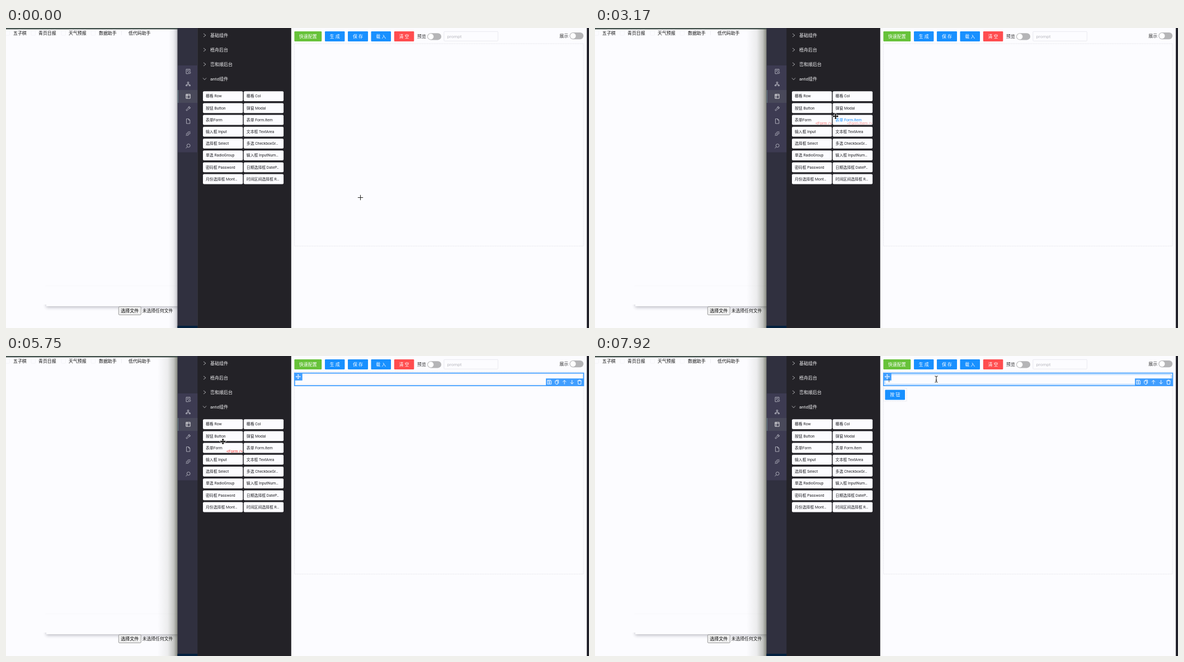
An HTML page with a canvas that plays this animation: 1042 by 537 pixels, repeating every 8 s.

```html
<!DOCTYPE html>
<html lang="zh-CN">
<head>
<meta charset="utf-8">
<title>低代码助手</title>
<style>
html, body { margin: 0; width: 100%; height: 100%; overflow: hidden; background: #fcfcff; }
canvas { display: block; width: 1042px; height: 537px; }
</style>
</head>
<body>
<canvas id="stage"></canvas>
<script>
const W = 1042, H = 537, LOOP = 8000, FPS = 12;
const canvas = document.getElementById('stage');
const ctx = canvas.getContext('2d');
const dpr = window.devicePixelRatio || 1;
canvas.width = W * dpr;
canvas.height = H * dpr;

const FONT = 'Roboto, "Noto Sans CJK SC", "Noto Sans CJK", sans-serif';
const PAGE = '#fcfcff', BLUE = '#1890ff', PICK = '#409eff';

function rect(x, y, w, h, color) {
  ctx.fillStyle = color;
  ctx.fillRect(x, y, w, h);
}

function box(x, y, w, h, r, fill, stroke, lw = 0.7) {
  ctx.beginPath();
  ctx.roundRect(x, y, w, h, r);
  if (fill) { ctx.fillStyle = fill; ctx.fill(); }
  if (stroke) { ctx.strokeStyle = stroke; ctx.lineWidth = lw; ctx.stroke(); }
}

function text(str, x, y, color, size = 8, align = 'left', weight = 400) {
  ctx.font = `${weight} ${size}px ${FONT}`;
  ctx.textAlign = align;
  ctx.textBaseline = 'alphabetic';
  ctx.fillStyle = color;
  ctx.fillText(str, x, y + size * 0.37);
}

// Strokes SVG path data around a centre point.
function icon(d, x, y, color, lw = 0.9) {
  ctx.save();
  ctx.translate(x, y);
  ctx.strokeStyle = color;
  ctx.lineWidth = lw;
  ctx.stroke(new Path2D(d));
  ctx.restore();
}

function dashed(x, y, w, h, color = '#d6d6dc') {
  ctx.save();
  ctx.setLineDash([1.8, 1.2]);
  ctx.strokeStyle = color;
  ctx.lineWidth = 0.6;
  ctx.strokeRect(x, y, w, h);
  ctx.restore();
}

const SIDE_ICONS = [
  'M1 4H-3.5V-4H3.5V-0.5M-2-2H2M-2 0H0M1 2A1.7 1.7 0 1 0 4.4 2A1.7 1.7 0 1 0 1 2',
  'M-1.2-3.3H1.2V-1H-1.2ZM0-1V1M-2.8 2V1H2.8V2M-4 2H-1.6V3.6H-4ZM1.6 2H4V3.6H1.6Z',
  'M-3.7-3.7H3.7V3.7H-3.7ZM-3.7-1.5H3.7M-1.5-3.7V3.7',
  'M-3.7 2.3L0-1.4A2.5 2.5 0 0 1 2.6-3.9L1.4-2.2L2.4-1.2L4-2.5A2.5 2.5 0 0 1 1.4 0L-2.3 3.7Z',
  'M-3-4.2H1L3.3-1.9V4.2H-3ZM1-4.2V-1.9H3.3',
  'M-4 4L-2.5 2.5M4-4L2.7-2.7M-2.5 2.5A2.2 2.2 0 0 1-2-1L1 2A2.2 2.2 0 0 1-2.5 2.5M2.7-2.7A2.2 2.2 0 0 1 2.3 1L-.8-2.1A2.2 2.2 0 0 1 2.7-2.7',
  'M-1.7 1.5L-4 4M-2.2-.8A2.9 2.9 0 1 0 3.6-.8A2.9 2.9 0 1 0-2.2-.8'
];

const TOOL_ICONS = [
  'M-3.5-3.5H2.3L3.5-2.3V3.5H-3.5ZM-1.7-3.5V-1.5H1.5V-3.5M-1.2 1.2A1.2 1.2 0 1 0 1.2 1.2A1.2 1.2 0 1 0-1.2 1.2',
  'M-1.5-3.7H3V2.5M-3-2.3H1.3V3.7H-1.2L-3 2Z',
  'M0 3.7V-3.3M-3-.2L0-3.3L3-.2',
  'M0-3.7V3.3M-3 .2L0 3.3L3 .2',
  'M-3.7-2.4H3.7M-1.4-2.4V-3.7H1.4V-2.4M-2.9-2.4L-2.5 3.7H2.5L2.9-2.4'
];

const MOVE = 'M-4 0H4M0-4V4M-2.8-1.2L-4 0L-2.8 1.2M2.8-1.2L4 0L2.8 1.2M-1.2-2.8L0-4L1.2-2.8M-1.2 2.8L0 4L1.2 2.8';

function drawLeftPage(focused) {
  rect(0, 0, 307, H, PAGE);
  rect(0, 0, 307, 2.4, '#46544f');
  [['五子棋', 13], ['青页日报', 58], ['天气预报', 112], ['数据助手', 166], ['低代码助手', 219]]
    .forEach(([label, x]) => text(label, x, 9, '#111', 7.9));
  [-1, 45, 99, 152].forEach(x => box(x, 5, 7.5, 8, 1, null, '#eeeef3', 0.6));
  rect(206, 5, 0.6, 8, '#e4e4ea');

  ctx.save();
  ctx.shadowColor = 'rgba(40,40,60,.32)';
  ctx.shadowBlur = 6 * dpr;
  ctx.shadowOffsetY = 2 * dpr;
  rect(72, 470, 240, 28, PAGE);
  ctx.restore();
  rect(60, 455, 247, 40, PAGE);
  rect(70, 461.5, 237, 0.5, '#f3f3f6');
  box(201.3, 499, 40, 14.5, 1.6, '#efefef', '#767676', 0.7);
  text('选择文件', 221.3, 506.3, '#000', 8, 'center', 500);
  text('未选择任何文件', 243.7, 506.3, '#111', 7.8);

  const from = focused ? 271 : 291;
  const g = ctx.createLinearGradient(from, 0, 307, 0);
  const tint = focused ? '50,54,36' : '45,45,60';
  g.addColorStop(0, `rgba(${tint},0)`);
  g.addColorStop(0.5, `rgba(${tint},${focused ? 0.08 : 0.06})`);
  g.addColorStop(0.8, `rgba(${tint},${focused ? 0.28 : 0.17})`);
  g.addColorStop(1, `rgba(${tint},${focused ? 0.6 : 0.38})`);
  ctx.fillStyle = g;
  ctx.fillRect(from, 2, 307 - from, H);
}

function drawSidebar() {
  rect(306.5, 0, 36, H, '#30303f');
  rect(307, 67, 35.5, 155.5, '#3d3b52');
  rect(307, 111, 35.5, 23, '#49495a');
  rect(307, 111, 1, 23, '#67808c');
  rect(306.5, 533, 36, 4, '#03213f');
  SIDE_ICONS.forEach((d, i) =>
    icon(d, 325.5, 77.8 + i * 22.25, i === 2 ? '#fff' : '#c6c6d0', 0.8));
}

const CARDS = [
  '栅格 Row', '栅格 Col', '按钮 Button', '弹窗 Modal', '表单Form', '表单 Form.Item',
  '输入框 Input', '文本框 TextArea', '选择框 Select', '多选 CheckboxGr…',
  '单选 RadioGroup', '输入框 InputNum…', '密码框 Password', '日期选择框 DateP…',
  '月份选择框 Mont…', '时间区间选择框 R…'
];

// card, step entered, step left, tag
const HOVERS = [
  [0, 28.7, 31, 'Row'], [2, 31, 33, 'Button'], [4, 33, 37, 'Form'],
  [5, 37, 39, 'Form.Item'], [3, 39, 43, 'Modal'], [5, 43, 45, 'Form.Item'],
  [6, 46, 59, 'Input'], [4, 64, 69, 'Form'], [2, 70, 82, 'Button']
];

function drawPanel(n) {
  rect(342.5, 0, 167.5, H, '#232227');
  ['基础组件', '梧舟后台', '峦和顺后台', 'antd组件'].forEach((label, i) => {
    const y = 13 + i * 26;
    icon(i < 3 ? 'M-2-3L2 0L-2 3' : 'M-3-1.6L0 1.8L3-1.6', 355, y, '#c8c8cc', 0.8);
    text(label, 365, y, '#f2f2f4', 8);
  });
  const spot = i => [352 + (i % 2) * 72.8, 113.2 + (i >> 1) * 21.2];
  CARDS.forEach((label, i) => {
    const [x, y] = spot(i);
    const hot = HOVERS.some(([c, a, b]) => c === i && n >= a && n < b);
    box(x, y, 71.3, 17.8, 2, PAGE);
    text(label, x + 5, y + 8.7, hot ? BLUE : '#222226', 6.86);
  });
  HOVERS.forEach(([i, a, b, tag]) => {
    const alpha = Math.min(1, (n - a) / 2, 1 - (n - b) / 3);
    if (alpha <= 0) return;
    const [x, y] = spot(i);
    ctx.globalAlpha = alpha;
    text(`<${tag} />`, x + 71, y + 14.3, '#f5302d', 7.2, 'right');
    ctx.globalAlpha = 1;
  });
}

function button(label, x, y, w, color, weight = 400) {
  box(x, y, w, 18, 1.2, color);
  text(label, x + w / 2, y + 9, '#fff', 8, 'center', weight);
}

function toggle(x, y) {
  box(x, y, 25, 12.2, 6.1, '#b5b5b7');
  ctx.beginPath();
  ctx.arc(x + 6.2, y + 6.1, 5.1, 0, 7);
  ctx.fillStyle = '#fff';
  ctx.fill();
}

function drawHeader() {
  rect(509.8, 0, 528.4, H, PAGE);
  button('快速配置', 515.4, 6, 48.8, '#67c23a', 500);
  button('生 成', 570, 6, 35.4, BLUE, 500);
  button('保 存', 611, 6, 36, BLUE, 500);
  button('载 入', 652.5, 6, 35.5, BLUE, 500);
  button('清 空', 693.8, 6, 35.5, '#ff4d4f', 500);
  text('预览', 735, 15, '#333', 7.9);
  toggle(753, 9.2);
  box(782.8, 6.3, 96.5, 17, 1.2, PAGE, '#dedee4', 0.6);
  text('prompt', 788.5, 14.8, '#b9b9bf', 8);
  text('展示', 989.3, 13.7, '#333', 7.9);
  toggle(1007.2, 8);
}

function drawPicked(x, y, w, h) {
  box(x, y, w, h, 0, null, PICK, 1.8);
  rect(x - 0.6, y - 0.6, 14.5, 13.8, PICK);
  icon(MOVE, x + 6.4, y + 6.4, '#fff', 1);
  const right = x + w + 0.6;
  rect(right - 68, y + h - 13, 68, 13.6, PICK);
  TOOL_ICONS.forEach((d, i) =>
    icon(d, right - 61.9 + i * 13.5, y + h - 6.4, '#fff', 0.9));
}

function drawCanvas(n) {
  const hasInput = n >= 54, hasButton = n >= 78;
  const inputPicked = (n >= 56 && n < 78) || n >= 92;
  const buttonPicked = n >= 79 && n < 92;
  ctx.save();
  ctx.beginPath();
  ctx.rect(509.8, 0, 528.4, H);
  ctx.clip();
  dashed(515.5, 28, 516.5, 362.3);
  if (hasInput) {
    dashed(515.6, 30.4, 516.4, 22.8);
    box(518.3, 33.2, 511.5, 17.4, 1.2, PAGE, n >= 90 ? '#69b4ff' : inputPicked ? '#ececf1' : '#d9d9de', 0.7);
    if (inputPicked) drawPicked(515.8, 30.6, 516.6, 22.6);
    if (n >= 94) rect(525, 41, 0.7, 6, '#333');
  }
  if (hasButton) {
    dashed(515.6, 57.5, 41.5, 23.5);
    button('按 钮', 518.4, 60.5, 35.6, BLUE);
    if (buttonPicked) drawPicked(515.8, 58.2, 41, 22.8);
  }
  ctx.restore();
  rect(1038.2, 0, 4, H, '#22222b');
}

// step, x, y
const PATH = [
  [0, 633.5, 303.5], [5, 633.5, 303.5], [12, 576, 165], [16, 576, 165],
  [21, 417, 86], [24, 417, 86], [29, 397, 131], [34, 400, 163],
  [38, 430, 158], [41, 445, 146], [44, 432, 165], [45, 418, 172],
  [48, 398, 186], [49, 398, 186], [54, 571, 126], [58, 571, 126],
  [59, 552, 131.5], [62, 440, 165], [65, 395, 165], [69, 387.7, 153],
  [71, 388, 145], [73, 388, 145], [78, 575, 128], [81, 575, 128],
  [86, 597.5, 133.5], [87, 597.5, 133.5], [91, 611, 44], [95, 610, 41.5]
];

function pointer(n) {
  const i = PATH.findIndex(k => k[0] >= n);
  const b = PATH[i], a = PATH[Math.max(0, i - 1)];
  const u = b[0] === a[0] ? 1 : (n - a[0]) / (b[0] - a[0]);
  const e = u * u * (3 - 2 * u);
  return [a[1] + (b[1] - a[1]) * e, a[2] + (b[2] - a[2]) * e];
}

function drawPointer(n) {
  const [x, y] = pointer(n);
  if (n < 14) {
    icon('M-5 0H5M0-5V5', x, y, '#fff', 1.8);
    icon('M-4.7 0H4.7M0-4.7V4.7', x, y, '#222', 1);
  } else if ((n >= 28 && n < 50) || (n >= 63 && n < 74)) {
    icon(MOVE, x, y, '#fff', 3);
    icon(MOVE, x, y, '#000', 1.6);
  } else if (n >= 90) {
    const beam = 'M-2.6-5.5Q0-5.5 0-4V4Q0 5.5-2.6 5.5M2.6-5.5Q0-5.5 0-4M0 4Q0 5.5 2.6 5.5M-1.3 1.8H1.3';
    icon(beam, x, y, '#fff', 2);
    icon(beam, x, y, '#111', 1);
  } else {
    const arrow = 'M0-.5V9.3L2.2 7.3L3.7 10.8L5.3 10.1L3.8 6.8L6.8 6.6Z';
    icon(arrow, x, y, '#fff', 1.6);
    ctx.save();
    ctx.translate(x, y);
    ctx.fillStyle = '#000';
    ctx.fill(new Path2D(arrow));
    ctx.restore();
  }
}

function draw(n) {
  ctx.setTransform(dpr, 0, 0, dpr, 0, 0);
  drawLeftPage(n >= 14);
  drawSidebar();
  drawPanel(n);
  drawHeader();
  drawCanvas(n);
  drawPointer(n);
}

const start = performance.now();
function tick() {
  const t = (performance.now() - start) % LOOP;
  const last = LOOP * FPS / 1000 - 1;
  draw(Math.min(last, Math.floor((t + 5) * FPS / 1000)));
  requestAnimationFrame(tick);
}
tick();
</script>
</body>
</html>
```
